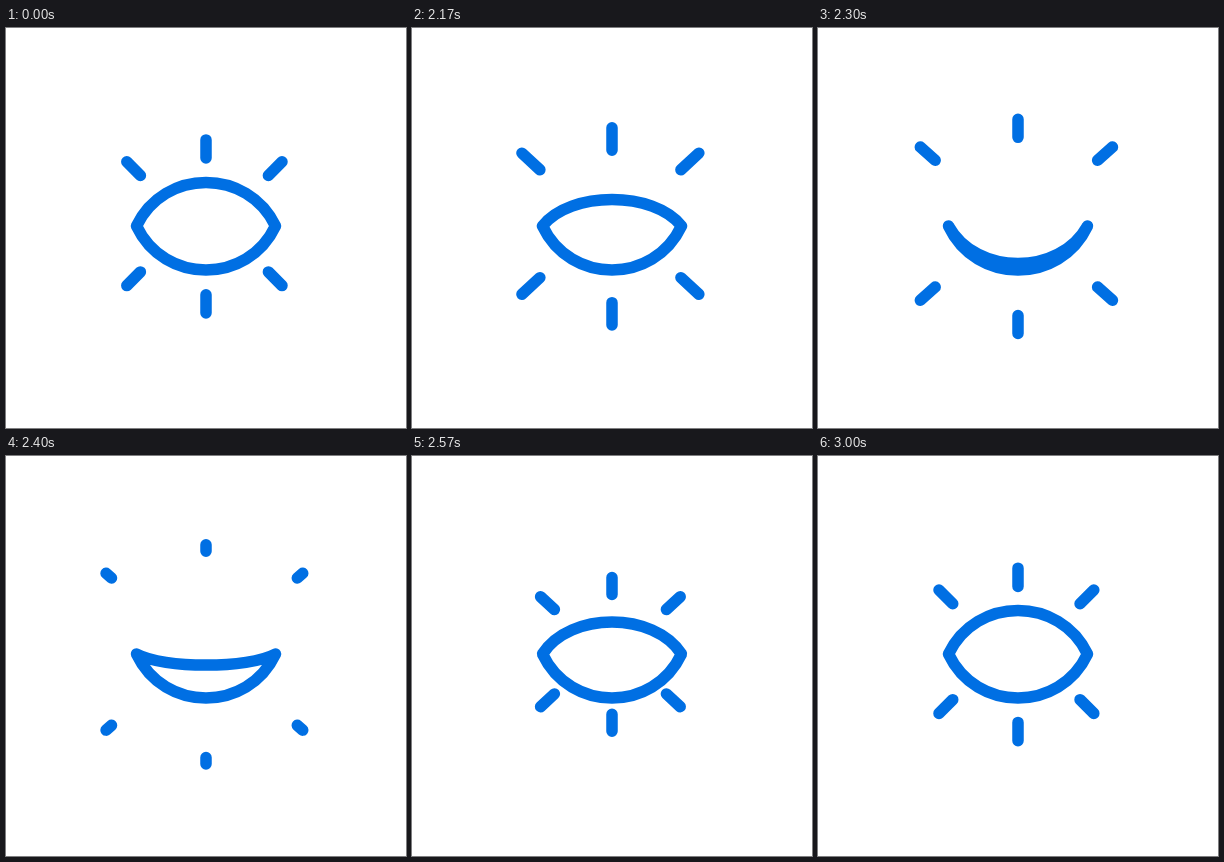
Animation of 400 by 400 pixels, one loop 3020 ms. Source, as an HTML page:

```html
<!DOCTYPE html>
<html lang="en">
<head>
<meta charset="utf-8">
<title>Blinking eye</title>
<style>
  html, body { margin: 0; width: 100%; height: 100%; overflow: hidden; background: #fff; }
  svg { display: block; width: 100%; height: 100%; }
  path { fill: none; stroke: #006fe3; stroke-width: 11.5; stroke-linecap: round; stroke-linejoin: round; }
</style>
</head>
<body>
<svg viewBox="0 0 400 400">
  <path id="rays"/>
  <path id="eye"/>
</svg>
<script>
  const LOOP = 3020, STEP = 25, BLINK = 2000;
  const eye = document.getElementById('eye');
  const rays = document.getElementById('rays');

  const clamp = v => Math.min(1, Math.max(0, v));
  const mix = (a, b, k) => a + (b - a) * k;
  const smooth = k => k * k * (3 - 2 * k);
  const settle = (t, from, span) => 1 - Math.exp((from - t) / span);

  // Each ray: centre, then inner and outer ends relative to it.
  const ray = (cx, cy, inner, outer) => ({ cx, cy, inner, outer });
  const RAYS = [];
  for (const sy of [-1, 1]) {
    RAYS.push(ray(200, 198.4, [0, 68.4 * sy], [0, 86.5 * sy]));
    for (const sx of [-1, 1]) {
      RAYS.push(ray(198.4, 195.7, [64 * sx, 48.2 * sy], [77.6 * sx, 61.9 * sy]));
    }
  }

  // 0 = open, 1 = closed
  function lidAt(t) {
    return t < 333 ? clamp(t / 308) ** 2.9 : (1 - clamp((t - 333) / 645)) ** 4.3;
  }

  function drawEye(t) {
    const up = mix(-58, 58.7, lidAt(t));
    const y = dy => (198 + dy).toFixed(2);
    eye.setAttribute('d',
      `M130.5 198C158.2 ${y(up)} 241.8 ${y(up)} 269.5 198` +
      `C241.8 ${y(58.7)} 158.2 ${y(58.7)} 130.5 198Z`);
  }

  // Rays fly out and shrink to their tips, then burst out again from the centre.
  function rayEnds(t, { inner, outer }) {
    if (t < 440) {
      const far = 1.267;
      const lead = mix(1, far, smooth(clamp(t / 400) ** 0.8));
      const trail = (t / 440) ** 1.8;
      return [
        inner.map((v, i) => mix(v, outer[i] * far, trail)),
        outer.map(v => v * lead)
      ];
    }
    const a = settle(t, 292, 136), b = settle(t, 325, 114);
    const [x, y] = outer;
    return [inner.map(v => v * a), [mix(x * 0.1, x, b), y * b]];
  }

  function drawRays(t) {
    rays.setAttribute('d', RAYS.map(r => {
      const [a, b] = rayEnds(t, r).map(p =>
        `${(r.cx + p[0]).toFixed(2)} ${(r.cy + p[1]).toFixed(2)}`);
      return `M${a}L${b}`;
    }).join(''));
  }

  const start = performance.now();
  function draw(now) {
    const clock = Math.max(0, now - start) % LOOP;
    const t = Math.max(0, Math.floor((clock + 5) / STEP) * STEP - BLINK);
    drawEye(t);
    drawRays(t);
    requestAnimationFrame(draw);
  }
  draw(start);
</script>
</body>
</html>
```
